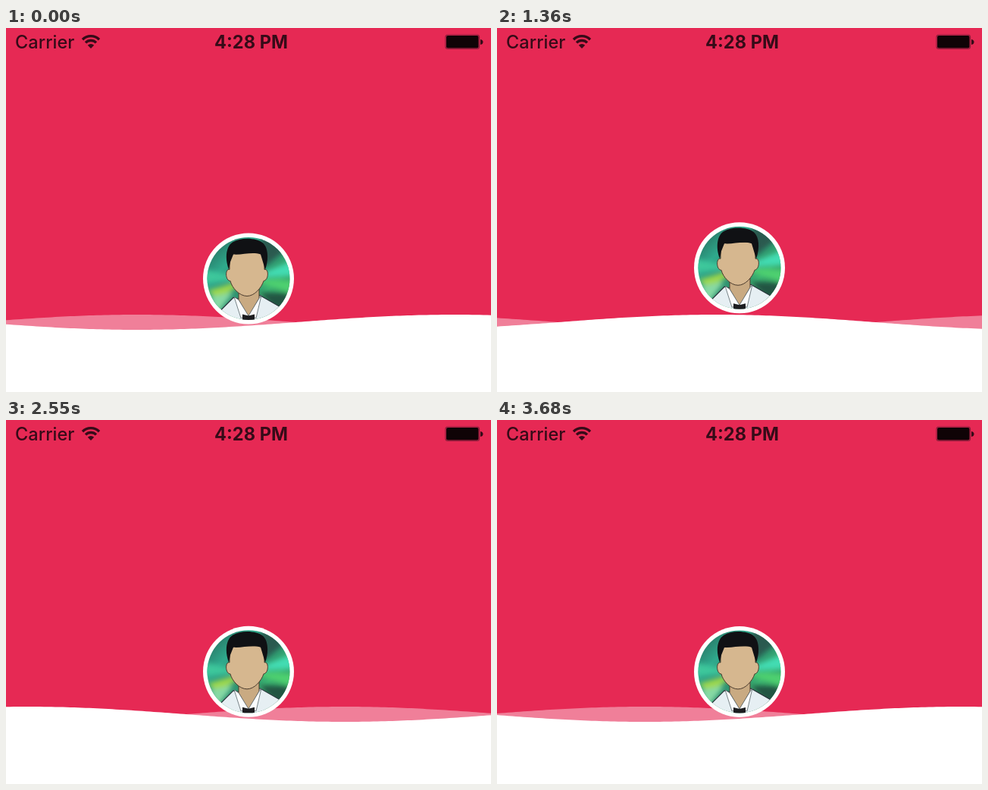
An HTML page that plays this animation: 640 by 480 pixels, repeating every 3.72 s.

```html
<!DOCTYPE html>
<html lang="en">
<head>
<meta charset="utf-8">
<title>Wave header</title>
<style>
  html, body { margin: 0; width: 100%; height: 100%; overflow: hidden; background: #e62954; }
  svg { display: block; width: 640px; height: 480px; }
  text { font-family: Inter, Roboto, sans-serif; font-size: 23.6px; fill: #360b18; }
</style>
</head>
<body>
<svg viewBox="0 0 640 480" xmlns="http://www.w3.org/2000/svg">
  <defs>
    <clipPath id="disc"><circle r="54.5"/></clipPath>
    <linearGradient id="sheen" x1="0" y1="0" x2="1" y2="1">
      <stop offset="0" stop-color="#24594f"/>
      <stop offset=".28" stop-color="#2fa98c"/>
      <stop offset=".5" stop-color="#2c8f70"/>
      <stop offset=".68" stop-color="#39b070"/>
      <stop offset="1" stop-color="#1c5443"/>
    </linearGradient>
    <filter id="soft"><feGaussianBlur stdDeviation="3"/></filter>
  </defs>

  <rect width="640" height="480" fill="#e62954"/>
  <path id="back" fill="#fff" fill-opacity=".4"/>
  <path id="front" fill="#fff"/>

  <g id="avatar">
    <circle r="60" fill="#fff"/>
    <g clip-path="url(#disc)">
      <rect x="-55" y="-55" width="110" height="110" fill="url(#sheen)"/>
      <g filter="url(#soft)">
        <path d="M0 0 60-24 60-4Z" fill="#43dcb2"/>
        <path d="M0 0 60 2 56 20Z" fill="#4ed070"/>
        <path d="M0 0 20-60 52-40Z" fill="#2a5a4f"/>
        <path d="M0 0-60-12-60 6Z" fill="#3cc79b"/>
        <path d="M0 0-54 16-40 28Z" fill="#9ed84c"/>
        <path d="M-20 18-50 24-44 50Z" fill="#86d9a4"/>
        <path d="M14 18 56 20 46 50Z" fill="#235443"/>
      </g>
      <path d="M-42 56-37 42-20 25 0 30 15 22 43 38 46 56Z" fill="#e6eff3" stroke="#28343a" stroke-width="1.2"/>
      <path d="M-13 8V28L0 50 14 26V8Z" fill="#c9aa82" stroke="#4a3a2c" stroke-width="1"/>
      <path d="M-19 24-13 28 0 49-10 52ZM17 22 14 26 0 49 10 52Z" fill="#fafcfd" stroke="#59656a" stroke-width=".8"/>
      <path d="M-8 47 0 49 8 47V56H-8Z" fill="#1c1d20"/>
      <path d="M-25-12C-31-14-31 3-24 3-22 12-12 23-2 23 8 23 17 12 20 3 27 2 27-14 21-12V-34H-25Z" fill="#d6b78f" stroke="#4a3a2c" stroke-width="1"/>
      <path d="M-26-12C-32-28-29-43-21-48C-10-55 11-54 19-47C26-41 27-26 22-12L19-22 16-32C5-36-8-31-20-32L-24-22Z" fill="#101114"/>
    </g>
  </g>

  <text x="12" y="27" font-weight="450">Carrier</text>
  <g fill="none" stroke="#360b18" stroke-width="3.4">
    <path d="M101 15.2A15.6 15.6 0 0 1 123 15.2"/>
    <path d="M105 19.4A9.9 9.9 0 0 1 119 19.4"/>
  </g>
  <path d="M112 27 107.8 22.8A6 6 0 0 1 116.2 22.8Z" fill="#360b18"/>
  <text x="323.5" y="27" text-anchor="middle" font-weight="650">4:28 PM</text>
  <rect x="580" y="9" width="44.5" height="18.5" rx="3" fill="none" stroke="#8a1c3a" stroke-width="1.2"/>
  <rect x="581" y="10" width="42.5" height="16.5" rx="2" fill="#0f0306"/>
  <path d="M626 15Q629.5 15.5 629.5 18.5T626 22Z" fill="#360b18"/>
</svg>
<script>
const LOOP = 3720, FPS = 22;
const MID = 388, AMP = 10, CURVE = 0.0075;
const START = 592, SPEED = 0.2217;
const CENTER = 320, LIFT = 62;

const el = id => document.getElementById(id);
const back = el('back'), front = el('front'), avatar = el('avatar');

const waveY = (x, crest, sign) => MID - sign * AMP * Math.cos(CURVE * (x - crest));

function wavePath(crest, sign) {
  let d = 'M0 480';
  for (let x = 0; x <= 640; x += 5) d += `L${x} ${waveY(x, crest, sign).toFixed(2)}`;
  return d + 'L640 480Z';
}

// Time held at 22 steps per second, on a 10 ms grid
function stepTime(t) {
  const tick = Math.floor(t / 10) * 10 + 5;
  return Math.floor(tick * FPS / 1000) * 1000 / FPS;
}

function draw(now) {
  const crest = START - SPEED * stepTime(now % LOOP);
  back.setAttribute('d', wavePath(crest, -1));
  front.setAttribute('d', wavePath(crest, 1));
  const y = waveY(CENTER, crest, 1) - LIFT;
  avatar.setAttribute('transform', `translate(${CENTER} ${y.toFixed(2)})`);
}

const first = performance.now();
function loop() {
  draw(performance.now() - first);
  requestAnimationFrame(loop);
}
loop();
</script>
</body>
</html>
```
